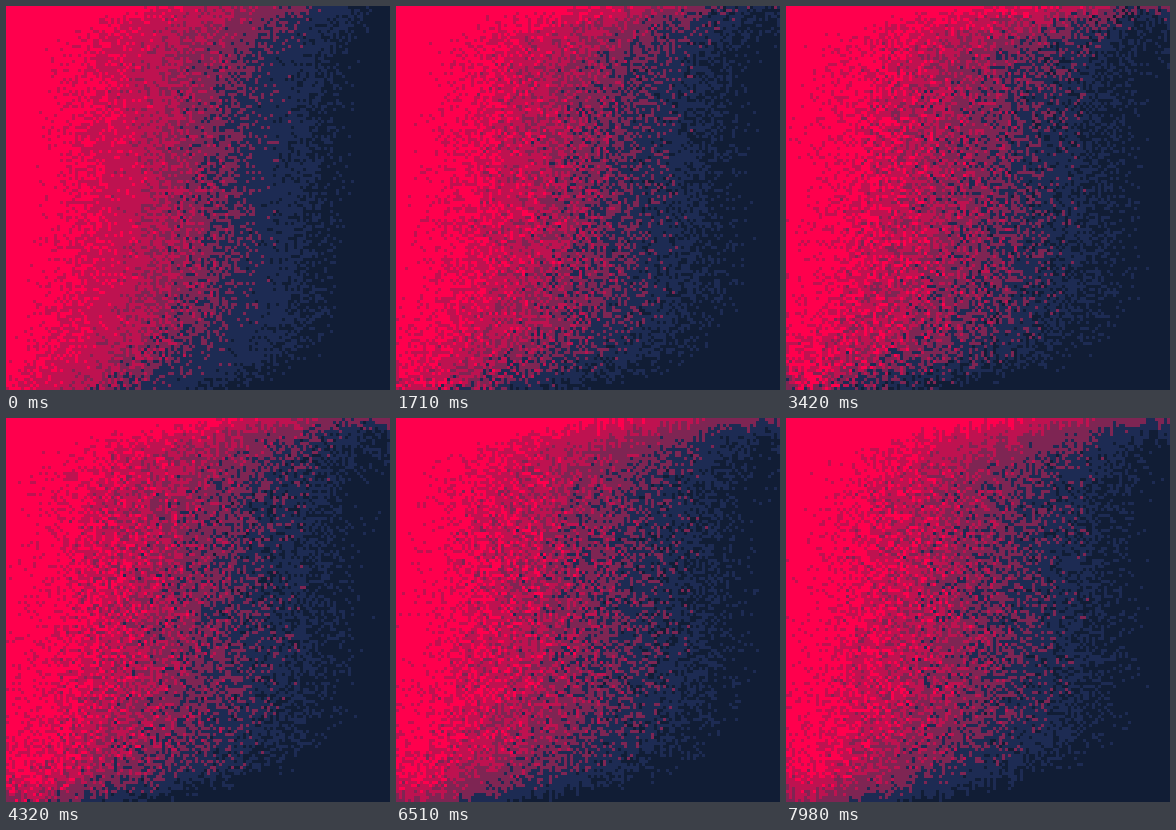
An HTML page with a canvas for the animation above (8000 ms loop, 384 by 384 pixels).

```html
<!DOCTYPE html>
<html lang="en">
<head>
<meta charset="utf-8">
<title>Dissolving gradient</title>
<style>
html, body { margin: 0; width: 100%; height: 100%; overflow: hidden; background: #111d35; }
canvas { display: block; width: 100%; height: 100%; image-rendering: pixelated; }
</style>
</head>
<body>
<canvas width="128" height="128"></canvas>
<script>
const SIZE = 128, CELL = 3, STAGE = SIZE * CELL, LOOP = 8000, STEP = 30, HOLD = 4;
const ctx = document.querySelector('canvas').getContext('2d');
const image = ctx.createImageData(SIZE, SIZE);
const pixels = new Uint32Array(image.data.buffer);

// Packed as ABGR for the little-endian pixel buffer.
const colors = [[255, 0, 77], [190, 18, 80], [126, 37, 83], [29, 43, 83], [17, 29, 53]]
  .map(([r, g, b]) => (255 << 24 | b << 16 | g << 8 | r) >>> 0);

// Each colour edge: centre x, bend at top and bottom (start, end), and bend depths.
const edges = [
  { mid: [88, 85], top: [85, 165], bottom: [70, 85], depth: [18, 80] },
  { mid: [168, 150], top: [75, 165], bottom: [90, 130], depth: [26, 50] },
  { mid: [224, 225], top: [85, 135], bottom: [115, 165], depth: [38, 40] },
  { mid: [306, 306], top: [45, 75], bottom: [110, 195], depth: [45, 32] }
];
const spreadKeys = [[0, 31], [1020, 37], [2370, 45], [3420, 48], [8000, 48]];

const mix = (a, b, k) => a + (b - a) * k;
const ramp = (t, from, to) => Math.min(1, Math.max(0, (t - from) / (to - from)));

function spreadAt(t) {
  const i = Math.max(1, spreadKeys.findIndex(([time]) => time >= t));
  const [t0, a] = spreadKeys[i - 1], [t1, b] = spreadKeys[i];
  return mix(a, b, ramp(t, t0, t1));
}

function hash(x, y, seed) {
  let h = Math.imul(x + 1, 374761393) ^ Math.imul(y + 1, 668265263) ^ Math.imul(seed + 1, 1274126177);
  h = Math.imul(h ^ h >>> 15, 2246822519);
  h = Math.imul(h ^ h >>> 13, 3266489917);
  return (h ^ h >>> 16) >>> 0;
}

// Triangular distribution, unit deviation.
function noise(x, y, seed) {
  const h = hash(x, y, seed);
  return ((h & 65535) + (h >>> 16)) / 65536 * 2.45 - 2.45;
}

const columnShift = Array.from({ length: SIZE }, (_, x) => noise(x, 0, 99) * 4);
const phase = Array.from({ length: SIZE * SIZE }, (_, i) => hash(i, 7, 55) % HOLD);

function draw(frame) {
  const t = frame * STEP;
  const spread = spreadAt(t);
  const bend = ramp(t, 0, 3400);
  const settle = ramp(t, 3500, 5200);
  const calm = mix(0.2, 1, settle);
  const rimDepth = mix(25, 32, settle);
  const shapes = edges.map(e => ({
    mid: mix(...e.mid, bend), top: mix(...e.top, bend),
    bottom: mix(...e.bottom, bend), depth: e.depth
  }));

  for (let x = 0; x < SIZE; x++) {
    const px = (x + 0.5) * CELL;
    const tilt = mix(1.2, 0.8, px / STAGE);
    const taper = tilt * (0.65 + 0.35 * Math.sin(Math.PI * px / STAGE));
    const leftHook = 90 * bend * Math.exp(-px / 7);
    const rightHook = 90 * bend * Math.exp((px - STAGE) / 7);
    for (let y = 0; y < SIZE; y++) {
      const i = y * SIZE + x;
      const py = (y + 0.5) * CELL;
      const rim = Math.exp(-Math.min(py, STAGE - py) / rimDepth);
      const seed = Math.floor((frame + phase[i]) / HOLD);
      const row = py + columnShift[x] * settle;
      const up = Math.max(0, row), down = Math.max(0, STAGE - row);
      const at = px + noise(x, y, seed) * spread * taper * (1 - calm * rim)
        + leftHook * Math.exp(-down / 60) - rightHook * Math.exp(-up / 50);
      let level = 0;
      for (const s of shapes) {
        const edge = s.mid + s.top * Math.exp(-up / s.depth[0]) - s.bottom * Math.exp(-down / s.depth[1]);
        if (at > edge) level++;
      }
      pixels[i] = colors[level];
    }
  }
  ctx.putImageData(image, 0, 0);
}

const start = performance.now();
let shown = -1;
function tick() {
  const frame = Math.floor((performance.now() - start) % LOOP / STEP);
  if (frame !== shown) draw(shown = frame);
  requestAnimationFrame(tick);
}
tick();
</script>
</body>
</html>
```
